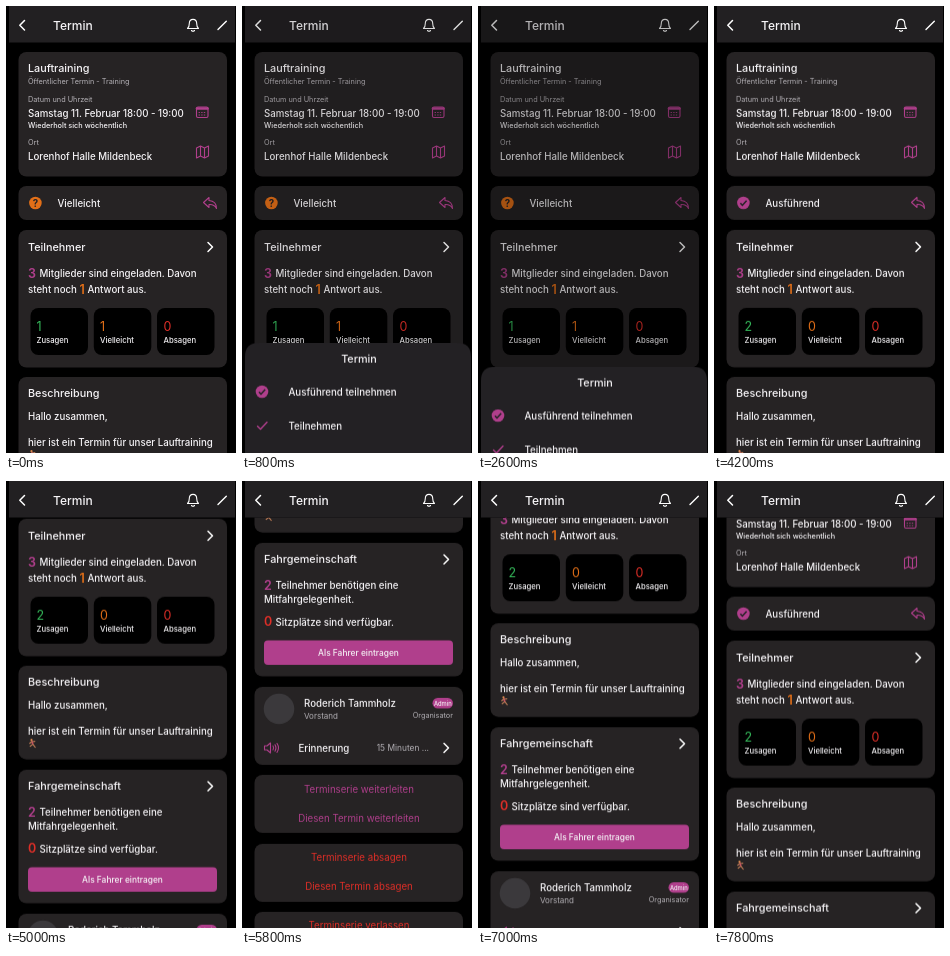
An HTML page for the animation above (8 s loop, 230 by 447 pixels).

```html
<!DOCTYPE html>
<html lang="de">
<head>
<meta charset="utf-8">
<title>Termin</title>
<style>
html, body { margin: 0; height: 100%; background: #000; overflow: hidden; }
svg { display: block; width: 100vw; height: 100vh; }
text { font: 500 9.7px Inter, "Open Sans", sans-serif; fill: #f6f4f7; dominant-baseline: central; }
.head { font-size: 12px; }
.title { font-size: 10.8px; }
.small { font-size: 7.3px; }
.label { font-size: 7.7px; }
.mid { font-size: 8.4px; }
.muted { fill: #b4b1b6; font-weight: 400; }
.num { font-size: 12.5px; font-weight: 600; }
.count { font-size: 12.5px; font-weight: 400; }
.center { text-anchor: middle; }
.end { text-anchor: end; }
.link { text-anchor: middle; font-weight: 400; }
.pink { fill: #b03f8c; }
.orange { fill: #e26f18; }
.green { fill: #35b85a; }
.red { fill: #df2f28; }
.card { fill: #262324; }
.line { fill: none; stroke: #b03f8c; stroke-width: 1.1; stroke-linecap: round; stroke-linejoin: round; }
.white { stroke: #fff; stroke-width: 1.5; }

#page, #sheet, #dim, #row, .ripple, .before, .after { animation: 8s linear infinite; }
#page { animation-name: scroll; }
#sheet { animation-name: sheet; }
#dim { animation-name: dim; }
#row { animation-name: row; }
#tap { animation-name: tap; }
#pick { animation-name: pick; }
.ripple { fill: #fff; opacity: 0; }
.before { animation-name: before; }
.after { animation-name: after; }

@keyframes scroll {
  0%, 52.5% { transform: none; }
  55% { transform: translateY(-28px); }
  57.5% { transform: translateY(-80px); }
  62.5% { transform: translateY(-186px); }
  67.5% { transform: translateY(-300px); }
  72.5% { transform: translateY(-413px); }
  75% { transform: translateY(-445px); }
  77.5% { transform: translateY(-452px); }
  80% { transform: translateY(-420px); }
  82.5% { transform: translateY(-358px); }
  87.5% { transform: translateY(-229px); }
  92.5% { transform: translateY(-138px); }
  97.5% { transform: translateY(-64.5px); }
  100% { transform: translateY(-40px); }
}
@keyframes sheet {
  0%, 8% { transform: translateY(178px); animation-timing-function: cubic-bezier(.2, .7, .3, 1); }
  17% { transform: none; }
  29% { transform: none; animation-timing-function: ease-in-out; }
  36%, 100% { transform: translateY(178px); }
}
@keyframes dim {
  0%, 8% { opacity: 0; }
  16%, 29% { opacity: .54; }
  36%, 100% { opacity: 0; }
}
@keyframes row {
  0%, 18% { opacity: 0; }
  20.5%, 28% { opacity: .18; }
  31%, 100% { opacity: 0; }
}
@keyframes tap {
  0%, 2% { transform: scale(0); opacity: 0; }
  3% { transform: scale(.2); opacity: .25; }
  6% { transform: scale(1.2); opacity: .2; }
  10%, 100% { transform: scale(5); opacity: 0; }
}
@keyframes pick {
  0%, 18% { transform: scale(0); opacity: 0; }
  19% { transform: scale(.2); opacity: .27; }
  22.5% { transform: scale(1); opacity: .27; }
  28%, 100% { transform: scale(5.6); opacity: 0; }
}
@keyframes before {
  0%, 37% { opacity: 1; }
  39%, 100% { opacity: 0; }
}
@keyframes after {
  0%, 37% { opacity: 0; }
  39%, 100% { opacity: 1; }
}
</style>
</head>
<body>
<svg viewBox="0 0 230 447" preserveAspectRatio="none">
  <defs>
    <path id="chevron" class="line white" d="M-2-4.5 2.5 0-2 4.5"/>
    <path id="tick" d="M-3 .2-1 2.4 3.2-2.2" fill="none" stroke="#252326" stroke-width="1.5"/>
    <g id="done"><circle r="6.3" class="pink"/><use href="#tick"/></g>
    <rect id="tile" y="302" width="57.5" height="47" rx="8"/>
    <clipPath id="answerClip"><rect x="13" y="180" width="208" height="34" rx="8"/></clipPath>
    <clipPath id="rowClip"><rect x="3" y="303" width="226" height="34"/></clipPath>
  </defs>
  <rect width="230" height="447"/>

  <g id="page">
    <g class="card">
      <rect x="12.5" y="46" width="208.5" height="124.5" rx="8"/>
      <rect x="12.5" y="180" width="208.5" height="34" rx="8"/>
      <rect x="12.5" y="224" width="208.5" height="137.5" rx="8"/>
      <rect x="12.5" y="371" width="208.5" height="93.7" rx="8"/>
      <rect x="12.5" y="475" width="208.5" height="133.5" rx="8"/>
      <rect x="12.5" y="619" width="208.5" height="78" rx="8"/>
      <rect x="12.5" y="707" width="208.5" height="58" rx="8"/>
      <rect x="12.5" y="776" width="208.5" height="58" rx="8"/>
      <rect x="12.5" y="844" width="208.5" height="58" rx="8"/>
    </g>

    <!-- Appointment -->
    <text class="title" x="22" y="62">Lauftraining</text>
    <text class="small muted" x="22" y="75">Öffentlicher Termin - Training</text>
    <text class="small muted" x="22" y="93">Datum und Uhrzeit</text>
    <text x="22" y="107">Samstag 11. Februar 18:00 - 19:00</text>
    <text class="small" x="22" y="119.5">Wiederholt sich wöchentlich</text>
    <text class="small muted" x="22" y="136.5">Ort</text>
    <text x="22" y="150.5">Lorenhof Halle Mildenbeck</text>
    <g class="line">
      <rect x="190.5" y="101" width="11.5" height="10.5" rx="1.5"/>
      <path d="M191 102.5h10.5" stroke-width="2.6"/>
      <path d="M193 106.5h7M193 109h7" stroke-dasharray=".6 2" stroke-width=".9"/>
      <path d="M190.5 142 194.5 140 198.5 142 202.5 140V150L198.5 152 194.5 150 190.5 152ZM194.5 140V150M198.5 142V152"/>
    </g>

    <!-- Own answer -->
    <g class="before">
      <circle cx="29.4" cy="197" r="6.3" class="orange"/>
      <text class="center" x="29.4" y="197" style="fill:#252326;font-weight:700">?</text>
      <text x="51.5" y="197.5">Vielleicht</text>
    </g>
    <g class="after">
      <use href="#done" x="29.4" y="197"/>
      <text x="51.5" y="197.5">Ausführend</text>
    </g>
    <path class="line" d="M203 191.5 197.5 196.5 203 201.5V198.5C207 198.2 209 199.5 210.5 202.5 210.5 197.5 207.5 194.8 203 194.5Z"/>
    <g clip-path="url(#answerClip)">
      <g transform="translate(204 197)"><circle id="tap" class="ripple" r="31"/></g>
    </g>

    <!-- Members -->
    <text class="title" x="22" y="241">Teilnehmer</text>
    <use href="#chevron" x="204" y="241"/>
    <text class="num pink" x="22" y="267">3</text>
    <text x="33.5" y="267.5">Mitglieder sind eingeladen. Davon</text>
    <text x="22" y="283">steht noch <tspan class="num orange">1</tspan> Antwort aus.</text>
    <use href="#tile" x="24.5"/>
    <use href="#tile" x="87.8"/>
    <use href="#tile" x="151"/>
    <g class="before">
      <text class="count green" x="30.5" y="320">1</text>
      <text class="count orange" x="94" y="320">1</text>
    </g>
    <g class="after">
      <text class="count green" x="30.5" y="320">2</text>
      <text class="count orange" x="94" y="320">0</text>
    </g>
    <text class="count red" x="157.5" y="320">0</text>
    <text class="label" x="30.5" y="334.5">Zusagen</text>
    <text class="label" x="94" y="334.5">Vielleicht</text>
    <text class="label" x="157.5" y="334.5">Absagen</text>

    <!-- Description -->
    <text class="title" x="22" y="387.5">Beschreibung</text>
    <text x="22" y="410.5">Hallo zusammen,</text>
    <text x="22" y="436">hier ist ein Termin für unser Lauftraining</text>
    <g fill="none" stroke-width="1.2" stroke-linecap="round">
      <circle cx="25.5" cy="445.2" r="1.1" fill="#d98a4e"/>
      <path d="M26 446.7 26.7 449.2" stroke="#c9456a" stroke-width="1.7"/>
      <path d="M25.5 447 23.8 448.5M26.5 447 28.8 446.6M26.6 449.6 24.2 451.5M27 449.6 29.2 452.5" stroke="#b97a55"/>
    </g>

    <!-- Car pool -->
    <text class="title" x="22" y="491.5">Fahrgemeinschaft</text>
    <use href="#chevron" x="204" y="491.5"/>
    <text class="num pink" x="22" y="517">2</text>
    <text x="33.5" y="517.5">Teilnehmer benötigen eine</text>
    <text x="22" y="531">Mitfahrgelegenheit.</text>
    <text class="num red" x="22" y="553.5">0</text>
    <text x="33.5" y="554">Sitzplätze sind verfügbar.</text>
    <rect class="pink" x="22" y="572.5" width="189" height="24.5" rx="4"/>
    <text class="mid center" x="116.5" y="584.5">Als Fahrer eintragen</text>

    <!-- Organiser -->
    <circle cx="37" cy="641" r="15.3" fill="#3b393c"/>
    <text x="62" y="635">Roderich Tammholz</text>
    <text class="muted" x="62" y="648" style="font-size:8px">Vorstand</text>
    <rect class="pink" x="190.5" y="630" width="20.5" height="10.5" rx="5.2"/>
    <text class="center" x="200.8" y="635.3" style="font-size:5.8px">Admin</text>
    <text class="small muted end" x="211" y="647.5">Organisator</text>
    <path class="line" d="M22.5 678V682H25L28.5 685V675L25 678ZM31 678Q32.2 680 31 682M33 676.8Q35 680 33 683.2M35 675.5Q38 680 35 684.5"/>
    <text x="56.5" y="680">Erinnerung</text>
    <text class="mid muted end" x="187" y="680">15 Minuten ...</text>
    <use href="#chevron" x="204" y="680"/>

    <!-- Actions -->
    <text class="link pink" x="117" y="721.5">Terminserie weiterleiten</text>
    <text class="link pink" x="117" y="750.5">Diesen Termin weiterleiten</text>
    <text class="link red" x="117" y="789.5">Terminserie absagen</text>
    <text class="link red" x="117" y="818.5">Diesen Termin absagen</text>
    <text class="link red" x="117" y="857">Terminserie verlassen</text>
    <text class="link red" x="117" y="886">Diesen Termin verlassen</text>
  </g>

  <!-- Header -->
  <rect width="230" height="36.5"/>
  <rect x="3" width="226" height="36.5" fill="#222022"/>
  <path class="line white" d="M18.5 14.5 13.8 19.3 18.5 24"/>
  <text class="head" x="47" y="19.2">Termin</text>
  <path class="line white" style="stroke-width:1.1" d="M181.5 22.5Q183.3 21 183.3 17.5C183.3 12 190.7 12 190.7 17.5Q190.7 21 192.5 22.5ZM185.5 24.5Q187 26 188.5 24.5"/>
  <path class="line white" style="stroke-width:1.4" d="M212 23.5 220.3 15.2"/>

  <rect id="dim" x="2.5" width="226.5" height="447"/>

  <!-- Answer sheet -->
  <g id="sheet">
    <path fill="#232124" d="M3 447V285Q3 271 17 271H215Q229 271 229 285V447Z"/>
    <text class="title center" x="117" y="287">Termin</text>
    <rect id="row" x="3" y="303" width="226" height="34" fill="#fff"/>
    <g clip-path="url(#rowClip)">
      <g transform="translate(170 321)"><circle id="pick" class="ripple" r="31"/></g>
    </g>
    <use href="#done" x="20" y="320"/>
    <path class="line" style="stroke-width:1.4" d="M15.5 354.5 18.5 357.5 25 350.5M15.5 417.5 24.5 426.5M24.5 417.5 15.5 426.5"/>
    <circle class="line" cx="20" cy="388" r="5.8"/>
    <text class="pink center" x="20" y="388.2" style="font-size:8.5px">?</text>
    <text x="46.5" y="320.5">Ausführend teilnehmen</text>
    <text x="46.5" y="354.5">Teilnehmen</text>
    <text x="46.5" y="388.5">Vielleicht</text>
    <text x="46.5" y="422.5">Absagen</text>
  </g>
</svg>
</body>
</html>
```
